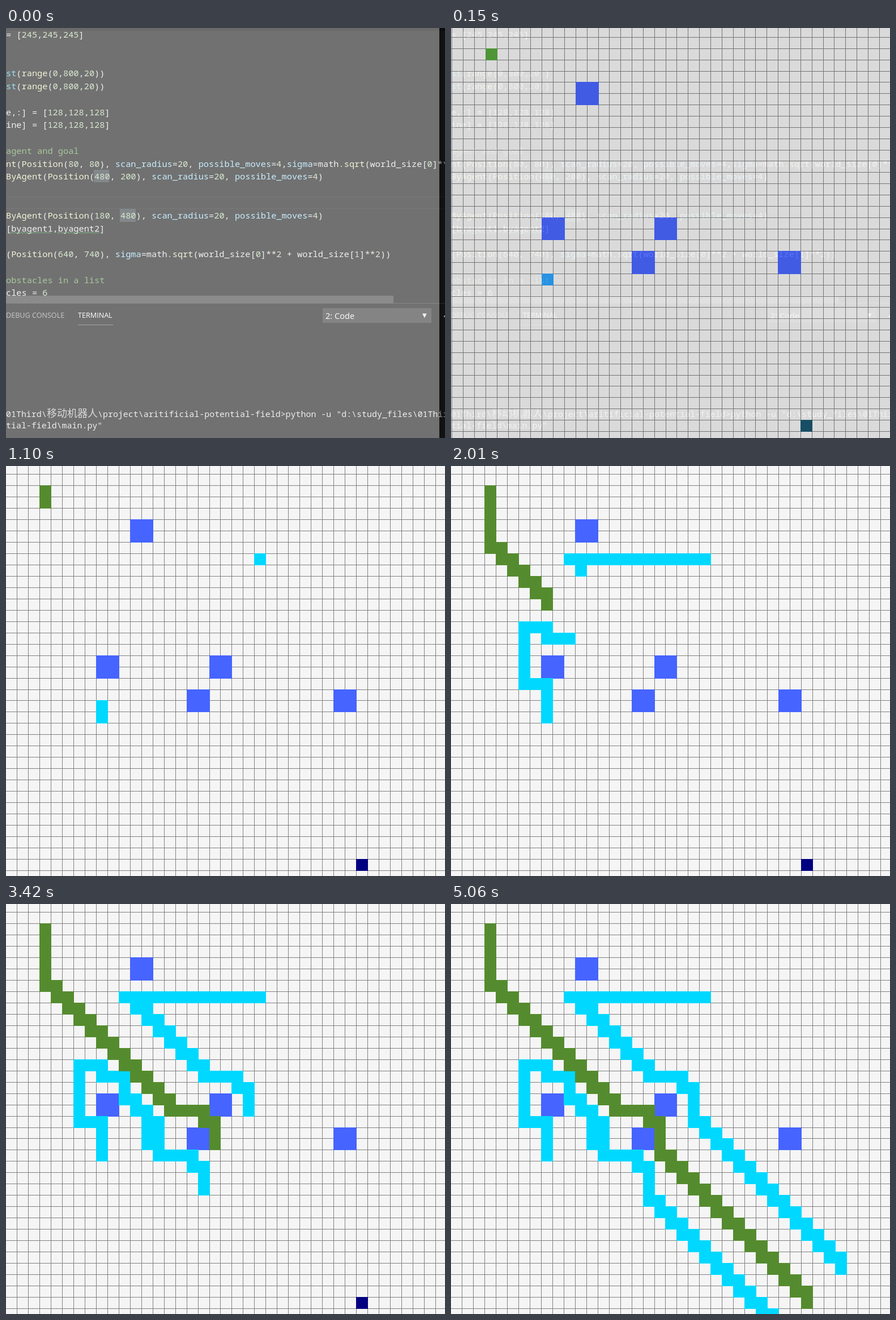
An HTML page with a canvas for the animation above (5.84 s loop, 775 by 723 pixels).

```html
<!DOCTYPE html>
<html lang="en">
<head>
<meta charset="utf-8">
<title>Potential field</title>
<style>
html, body { margin: 0; width: 100%; height: 100%; overflow: hidden; background: #1e1e1e; }
canvas { position: absolute; left: 0; top: 0; }
</style>
</head>
<body>
<canvas id="editor" width="775" height="723"></canvas>
<canvas id="world" width="775" height="723"></canvas>
<script>
const LOOP = 5840, W = 775, H = 723;
const editor = document.getElementById('editor').getContext('2d');
const world = document.getElementById('world');
const ctx = world.getContext('2d');

// ---- Editor behind the window ----
const MONO = '"Noto Sans Mono", monospace', SANS = '"Open Sans", sans-serif';
const code = {
  0: '= [245,245,245]',
  3: 'st(range(0,800,20))',
  4: 'st(range(0,800,20))',
  6: 'e,:] = [128,128,128]',
  7: 'ine] = [128,128,128]',
  9: '#agent and goal',
  10: 'nt(Position(80, 80), scan_radius=20, possible_moves=4,sigma=math.sqrt(world_size[0]**2 + ',
  11: 'ByAgent(Position(480, 200), scan_radius=20, possible_moves=4)',
  14: 'ByAgent(Position(180, 480), scan_radius=20, possible_moves=4)',
  15: '[byagent1,byagent2]',
  17: '(Position(640, 740), sigma=math.sqrt(world_size[0]**2 + world_size[1]**2))',
  19: '#obstacles in a list',
  20: 'cles = 6'
};

function box(color, x, y, w, h) {
  editor.fillStyle = color;
  editor.fillRect(x, y, w, h);
}

function text(str, x, y, color, font) {
  editor.font = font;
  editor.fillStyle = color;
  editor.fillText(str, x, y);
}

function tokenColor(token, next) {
  if (/^\d/.test(token)) return '#c4dcb6';
  if (token === 'st') return '#62d4e8';
  if (/^\w/.test(token) && next === '(') return '#ececc4';
  if (/^(scan_radius|possible_moves|sigma)$/.test(token)) return '#a8e4ff';
  return '#e8e8e8';
}

function codeLine(line, y) {
  const font = '500 15.3px ' + MONO;
  if (line[0] === '#') return text(line.slice(1), 0, y, '#74a660', font);
  for (const m of line.matchAll(/\w+|\W+/g)) {
    const next = line[m.index + m[0].length];
    text(m[0], m.index * 9.18, y, tokenColor(m[0], next), font);
  }
}

function squiggle(x0, x1, y) {
  editor.strokeStyle = '#4b9a4b';
  editor.beginPath();
  for (let x = x0; x <= x1; x += 2.5) editor.lineTo(x, y + ((x - x0) / 2.5 % 2 ? 2 : 0));
  editor.stroke();
}

function drawEditor() {
  box('#1e1e1e', 0, 0, W, H);
  box('#141414', 0, 0, W, 5);
  box('#2b2b2b', 0, 297, W, 1);
  box('#2b2b2b', 0, 318, W, 1);
  box('#3b4248', 155, 250, 27, 22);
  box('#3b4248', 201, 319, 28, 23);
  for (const i in code) codeLine(code[i], Math.round(17 + 22.77 * i));
  squiggle(7, 80, 360);
  squiggle(90, 165, 360);
  box('#484848', 0, 472, 684, 13);
  box('#414141', 0, 485, W, 1);

  text('DEBUG CONSOLE', 0, 511, '#a8a8a8', '12.6px ' + SANS);
  text('TERMINAL', 127, 511, '#ffffff', '12.6px ' + SANS);
  box('#707070', 127, 523, 62, 1);
  box('#3c3c3c', 559, 494, 192, 26);
  text('2: Code', 564, 513, '#ffffff', '14.6px ' + SANS);
  text('▼', 735, 510, '#f0f0f0', '10px "DejaVu Sans", sans-serif');
  box('#e0e0e0', 773, 507, 2, 3);

  const shell = '500 14.95px ' + MONO, ink = '#e4e4e4';
  text('01Third\\', 0, 686, ink, shell);
  text('移动机器人', 72, 686, '#c4c4c4', '300 18px "Noto Sans CJK SC", "Noto Sans CJK", sans-serif');
  text('\\project\\aritificial-potential-field>python -u "d:\\study_files\\01Third', 162, 686, ink, shell);
  text('tial-field\\main.py"', 0, 706, ink, shell);
}

// ---- Grid world ----
let scale = 1;
const zoom = (v, center) => Math.floor(center + (v - center) * scale);
const X = c => zoom(19.97 * c - 0.43, 399);
const Y = r => zoom(19.97 * r + 14.58, 350);
const rd = n => 'RD'.repeat(n);
const tail = 'RR' + rd(2) + 'DD' + rd(13);
const STEP = { L: [-1, 0], R: [1, 0], U: [0, -1], D: [0, 1] };
const obstacles = [[11, 4], [8, 16], [18, 16], [16, 19], [29, 19]];
const agents = [
  { at: [23, 7], color: '#00d8ff', hidden: true, moves: 'L'.repeat(13) + rd(7) + tail },
  { at: [8, 21], color: '#00d8ff', early: '#2aa2fd', moves: 'UUULLUUUUURRDRRDD' + rd(3) + 'LD' + rd(1) + tail },
  { at: [3, 1], color: '#558b2f', early: '#55a63c', moves: 'DDDDD' + rd(11) + tail }
];

// Bursts of screen updates: first time, last time, updates, moves made by the end
const bursts = [
  [1100, 1100, 1, 1], [1150, 1620, 7, 9], [1690, 2010, 5, 15], [2090, 2240, 3, 19],
  [2320, 2710, 6, 26], [2860, 3030, 3, 30], [3190, 3740, 8, 40], [3820, 4050, 4, 45],
  [4120, 4360, 4, 50], [4440, 4990, 8, 59], [5060, 5060, 1, 61]
];
const updates = [];
let done = 0;
for (const [from, to, n, total] of bursts) {
  for (let j = 0; j < n; j++) {
    const time = n > 1 ? from + (to - from) * j / (n - 1) : from;
    updates.push([Math.round(time / 10) * 10, done + Math.round((total - done) * (j + 1) / n)]);
  }
  done = total;
}

function cell(c, r, color, size = 1) {
  ctx.fillStyle = color;
  ctx.fillRect(X(c), Y(r), X(c + size) - X(c) + 1, Y(r + size) - Y(r) + 1);
}

function drawWorld(count, early) {
  ctx.fillStyle = '#f5f5f5';
  ctx.fillRect(0, 0, W, H);
  ctx.fillStyle = '#808080';
  for (let k = -1; k < 41; k++) {
    ctx.fillRect(X(k), 0, 1, H);
    ctx.fillRect(0, Y(k), W, 1);
  }
  for (const [c, r] of obstacles) cell(c, r, '#4664ff', 2);
  cell(31, 34, early ? '#17556e' : '#000080');
  for (const a of agents) {
    let [c, r] = a.at;
    const color = early && a.early || a.color;
    if (!a.hidden) cell(c, r, color);
    for (const m of a.moves.slice(0, count)) {
      c += STEP[m][0];
      r += STEP[m][1];
      cell(c, r, color);
    }
  }
}

function drawBlank() {
  ctx.fillStyle = '#000';
  ctx.fillRect(0, 0, W, H);
  ctx.fillStyle = '#fff';
  ctx.fillRect(0, 0, 765, H);
}

// Opening of the window: start time, opacity, scale
const opening = [[0, 0.37, 1], [80, 0.7, 0.978], [150, 0.88, 0.994], [240, 0.98, 0.9992], [340, 1, 1]];

function frame(now) {
  const t = now % LOOP;
  const [, opacity, size] = opening.filter(o => o[0] <= t).pop();
  const last = updates.filter(u => u[0] <= t).pop();
  world.style.opacity = opacity;
  scale = size;
  if (t < 80) drawBlank();
  else drawWorld(last ? last[1] : 0, t < 240);
  requestAnimationFrame(frame);
}

drawEditor();
requestAnimationFrame(frame);
</script>
</body>
</html>
```
